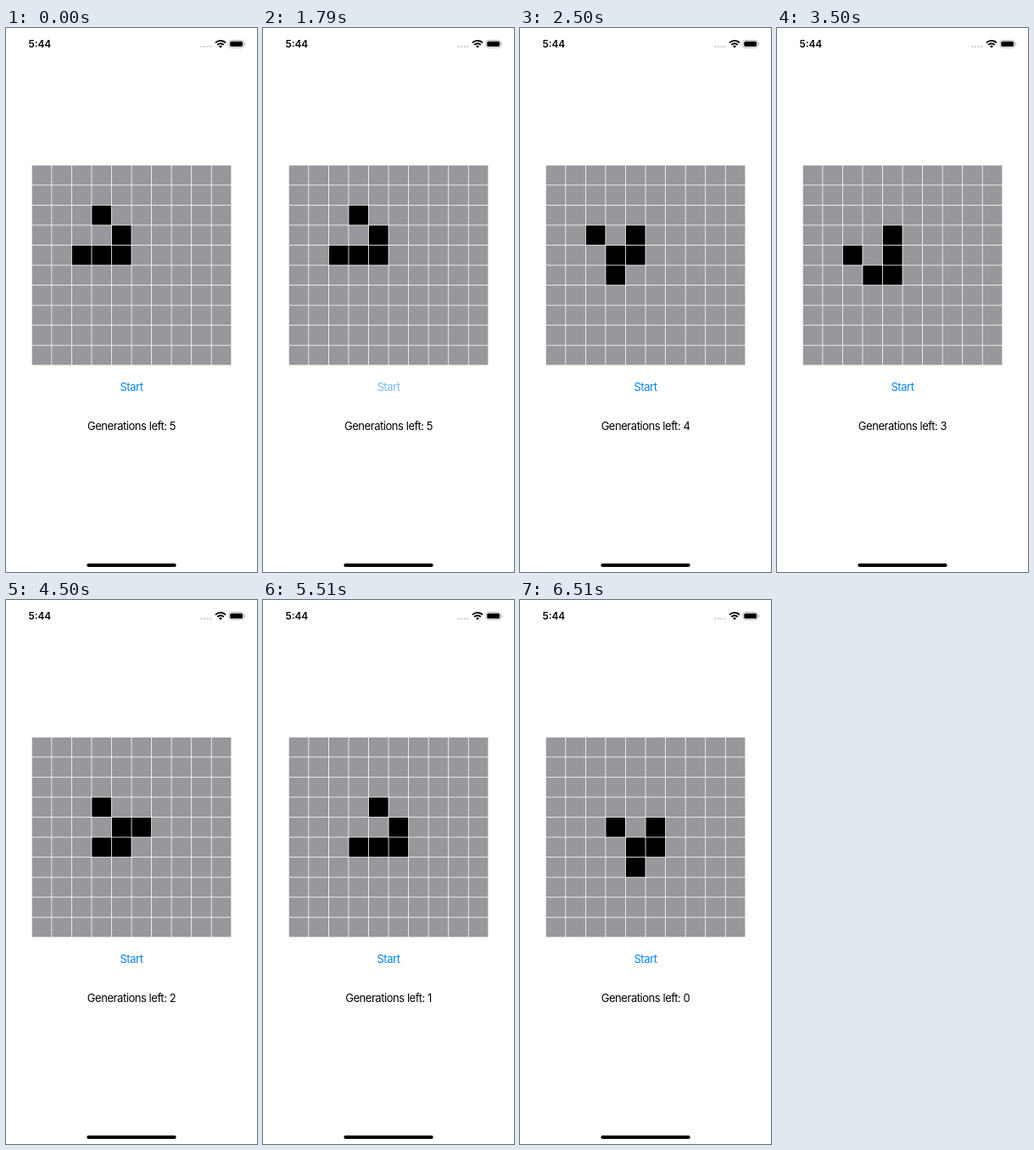
Animation of 296x640 px, one loop 7510 ms. Source, as an HTML page:

```html
<!DOCTYPE html>
<html lang="en">
<head>
<meta charset="utf-8">
<title>Game of Life</title>
<style>
  html, body { margin: 0; width: 100%; height: 100%; overflow: hidden; background: #fff; }
  svg { display: block; width: 296px; height: 640px; }
  text { font: 13px Inter, "Liberation Sans", sans-serif; letter-spacing: -.45px; text-anchor: middle; }
  #clock { font-size: 11.8px; font-weight: 600; letter-spacing: 0; }
  #start { fill: #0584f2; }
</style>
</head>
<body>
<svg viewBox="0 0 296 640">
  <text id="clock" x="39.8" y="23.2">5:44</text>
  <g fill="#c4c4c6">
    <circle cx="230.4" cy="22" r="1.1"/>
    <circle cx="234" cy="22" r="1.1"/>
    <circle cx="237.6" cy="22" r="1.1"/>
    <circle cx="241.2" cy="22" r="1.1"/>
  </g>
  <g fill="none" stroke="#000" stroke-width="1.8">
    <path d="M247 17.4a8.6 8.6 0 0 1 12 0"/>
    <path d="M249.2 19.8a5.4 5.4 0 0 1 7.6 0"/>
  </g>
  <path d="M251 21.5a2.9 2.9 0 0 1 4 0l-2 2z"/>
  <rect x="263" y="14.5" width="17.4" height="8.6" rx="2.6" fill="#fff" stroke="#a6a6a6" stroke-width=".8"/>
  <rect x="264.3" y="15.8" width="14.8" height="6" rx="1.5"/>
  <path d="M281.3 17.4q1.2 .5 1.2 1.4t-1.2 1.4z" fill="#a6a6a6"/>
  <g id="grid"></g>
  <text id="start" x="148" y="427">Start</text>
  <text id="count" x="148" y="472.8"></text>
  <rect x="95.3" y="630" width="105.4" height="4" rx="2"/>
</svg>
<script>
const SIZE = 10, PITCH = 23.55, CELL = 22.75, LEFT = 30.7, TOP = 161.7;
const LOOP = 7510;
const TICKS = [2500, 3500, 4500, 5510, 6510];
const PRESS = [1790, 1890];
const GRAY = '#97979c';

const grid = document.getElementById('grid');
const start = document.getElementById('start');
const count = document.getElementById('count');

const cells = Array.from({ length: SIZE * SIZE }, (_, i) => {
  const rect = document.createElementNS('http://www.w3.org/2000/svg', 'rect');
  rect.setAttribute('x', LEFT + (i % SIZE) * PITCH);
  rect.setAttribute('y', TOP + Math.floor(i / SIZE) * PITCH);
  rect.setAttribute('width', CELL);
  rect.setAttribute('height', CELL);
  return grid.appendChild(rect);
});

function nextGeneration(alive) {
  const at = (x, y) => x >= 0 && y >= 0 && x < SIZE && y < SIZE && alive[y * SIZE + x];
  return alive.map((live, i) => {
    const x = i % SIZE, y = Math.floor(i / SIZE);
    let near = live ? -1 : 0;
    for (let dy = -1; dy <= 1; dy++)
      for (let dx = -1; dx <= 1; dx++) near += at(x + dx, y + dy) ? 1 : 0;
    return near === 3 || (live && near === 2);
  });
}

const glider = [23, 34, 42, 43, 44];
const generations = [cells.map((_, i) => glider.includes(i))];
TICKS.forEach((_, i) => generations.push(nextGeneration(generations[i])));

let shown = -1;
function showGeneration(n) {
  if (n === shown) return;
  shown = n;
  cells.forEach((cell, i) => cell.setAttribute('fill', generations[n][i] ? '#000' : GRAY));
  count.textContent = `Generations left: ${TICKS.length - n}`;
}

function draw() {
  const t = performance.now() % LOOP;
  showGeneration(TICKS.filter(tick => t >= tick).length);
  start.setAttribute('opacity', t >= PRESS[0] && t < PRESS[1] ? .55 : 1);
  requestAnimationFrame(draw);
}
draw();
</script>
</body>
</html>
```
